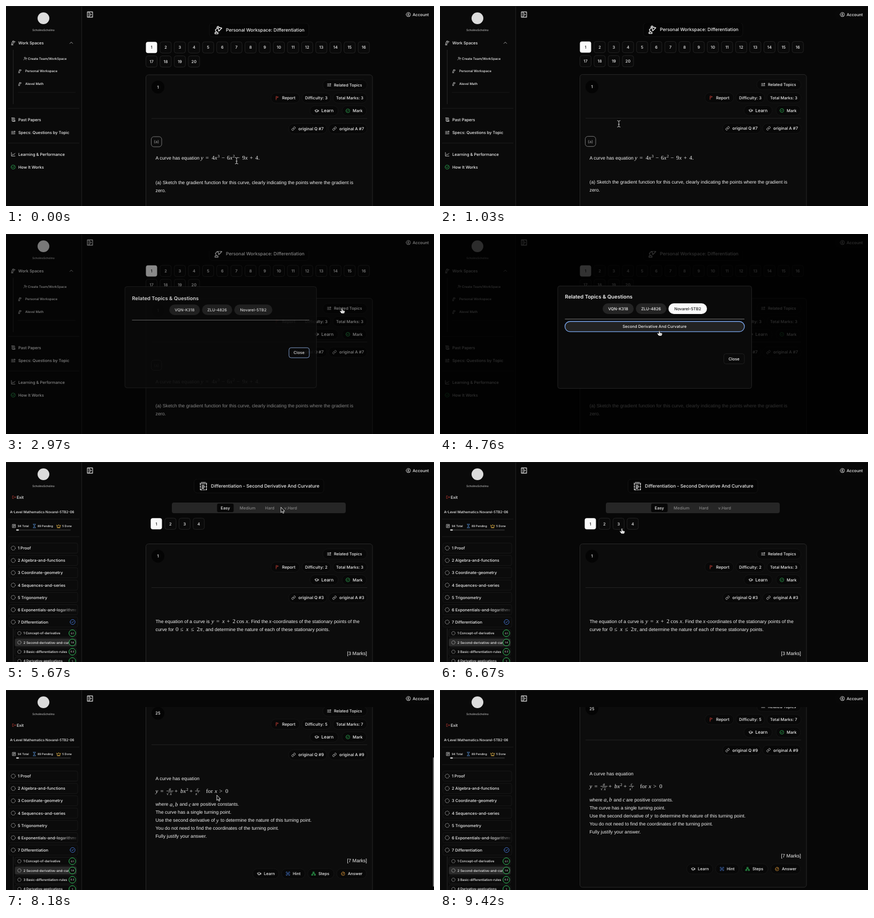
Animation, 800 px wide and 375 px high, one loop 9640 ms. Source, as an HTML page:

```html
<!DOCTYPE html>
<html lang="en">
<head>
<meta charset="utf-8">
<title>Practice workspace</title>
<style>
html, body { margin: 0; width: 100%; height: 100%; overflow: hidden; background: #070707; }
svg { display: block; width: 800px; height: 375px; }
text { font-family: Inter, sans-serif; font-weight: 500; white-space: pre; text-rendering: geometricPrecision; }
.body { font-family: "Liberation Sans", Arial, sans-serif; font-weight: 400; }
.math { font-family: "Liberation Serif", serif; font-weight: 400; }
.icon { fill: none; stroke-width: 2; stroke-linecap: round; stroke-linejoin: round; }
</style>
</head>
<body>
<svg id="stage" viewBox="0 0 800 375"></svg>
<script>
const LOOP = 9640;
const WHITE = '#f2f2f2', GREY = '#8b8b8b', GREEN = '#35c760', EDGE = '#242424';

const ICONS = {
  panel: 'M3 3h18v18H3zM9 3v18M13 9l3 3-3 3',
  user: 'M2 12a10 10 0 1 0 20 0 10 10 0 1 0-20 0M9 10a3 3 0 1 0 6 0 3 3 0 1 0-6 0M6 19c1-4 11-4 12 0',
  lamp: 'M14 5l-3 3 2 7 8-8zM14 5l-3 3-3-3 3-3zM9.5 6.5L4 12l3 6M3 22v-2q0-2 2-2h4q2 0 2 2v2z',
  list: 'M3 6h11M3 12h11M3 18h18M19 14V4l-3 3M19 4l3 3',
  flag: 'M6 22V3l12 4-12 6',
  cap: 'M22 10L12 5 2 10l10 5zM6 12v5c3 3 9 3 12 0v-5M22 10v6',
  check: 'M2 12a10 10 0 1 0 20 0 10 10 0 1 0-20 0M8 12l3 3 5-6',
  link: 'M10 13a5 5 0 0 0 7.5.5l3-3a5 5 0 0 0-7-7L12 5M14 11a5 5 0 0 0-7.5-.5l-3 3a5 5 0 0 0 7 7L12 19',
  hint: 'M3 8V3h5M16 3h5v5M21 16v5h-5M8 21H3v-5M7 12a5 5 0 1 0 10 0 5 5 0 1 0-10 0M12 11v2',
  steps: 'M9 3h6v5H9zM2 16h6v5H2zM16 16h6v5h-6zM12 8v4M5 16v-4h14v4',
  answer: 'M3 13a9 9 0 1 0 18 0 9 9 0 1 0-18 0M8 13l3 3 8-11M12 4V2',
  notes: 'M8 2v4M12 2v4M16 2v4M4 4v5M4 12v4M4 19v3h5M12 22h3M18 22h2v-3M20 16v-4M20 9V4M8 10h6M8 14h8M8 18h5',
  addUser: 'M6 7a4 4 0 1 0 8 0 4 4 0 1 0-8 0M2 21c0-9 16-9 16 0M19 8v6M16 11h6',
  scroll: 'M19 17V5q0-2-2-2H4q2 0 2 3v12q0 3 3 3h11q2 0 2-3H10v1M10 8h5M10 12h5',
  chart: 'M3 3v18h18M7 16l4-5 4 3 6-7',
  exit: 'M10 12h12M18 8l4 4-4 4M9 4H3v16h6',
  book: 'M4 3h16v18H4zM8 8h8M8 12h8M8 16h4',
  glass: 'M5 2h14M5 22h14M7 2c0 8 10 12 10 20M17 2c0 8-10 12-10 20',
  crown: 'M2 7l5 6 5-9 5 9 5-6-3 12H5zM5 22h14',
  up: 'M4 16l8-8 8 8'
};

const text = (x, y, s, size = 7.5, o = {}) =>
  `<text x="${x}" y="${y + size * .36}" font-size="${size}" fill="${o.fill || WHITE}"` +
  ` text-anchor="${o.anchor || 'start'}" class="${o.cls || ''}" style="${o.weight ? `font-weight:${o.weight}` : ''}"` +
  `${o.clip ? ` clip-path="url(#${o.clip})"` : ''}>${s}</text>`;
const mid = (x, y, s, size, fill, weight) => text(x, y, s, size, { anchor: 'middle', fill, weight });
const body = (x, y, s, size = 8.8) => text(x, y, s, size, { cls: 'body' });
const icon = (name, x, y, size = 9, color = WHITE) =>
  `<path class="icon" d="${ICONS[name]}" stroke="${color}" transform="translate(${x - size / 2} ${y - size / 2}) scale(${size / 24})"/>`;
const box = (x1, y1, x2, y2, r, fill, stroke = 'none', w = 1) =>
  `<rect x="${x1}" y="${y1}" width="${x2 - x1}" height="${y2 - y1}" rx="${r}" fill="${fill}" stroke="${stroke}" stroke-width="${w}"/>`;
const rule = (x1, y1, x2, y2, color = EDGE, w = 1) =>
  `<path d="M${x1} ${y1}L${x2} ${y2}" stroke="${color}" stroke-width="${w}"/>`;
const ring = (x, y, r, color, dash = '', fill = 'none') =>
  `<circle cx="${x}" cy="${y}" r="${r}" fill="${fill}" stroke="${color}" stroke-dasharray="${dash}"/>`;
const group = (id, content) => `<g id="${id}">${content}</g>`;

// Tokens are "x|glyphs"; ^ raises, ~ keeps letters upright, _ is small.
const math = (y, tokens) => tokens.split(' ').map(token => {
  const [x, raw] = token.split('|');
  const sup = raw[0] === '^', small = raw[0] === '_';
  const glyphs = raw.replace(/[\^~_]/, '');
  const italic = /^[a-zπ]+$/.test(glyphs) && raw[0] !== '~';
  const size = sup || small ? 7.3 : 10.7;
  return `<text class="math" x="${x}" y="${y + 3.4 - (sup ? 4 : 0)}" font-size="${size}" fill="${WHITE}"` +
    `${italic ? ' font-style="italic"' : ''}>${glyphs}</text>`;
}).join('');

const pill = (x1, x2, y, label, tx, name, color, size = 7.6) =>
  box(x1, y - 9.5, x2, y + 9.5, 9.5, '#080808', '#151515') +
  (name ? icon(name, tx - 9, y, 8.5, color) : '') + text(tx, y, label, size);

function actions(y) {
  return pill(461, 510, y, 'Learn', 482, 'cap', WHITE, 7.5) + pill(515, 559, y, 'Hint', 536, 'hint', '#4d86e8', 7.5) +
    pill(564, 613, y, 'Steps', 584, 'steps', GREEN, 7.5) + pill(618, 674, y, 'Answer', 639, 'answer', '#f0a43a', 7.5);
}

function card(top, bottom, q) {
  return box(261.5, top, 685, bottom, 5, '#0c0c0c', '#282828') +
    `<circle cx="284" cy="${top + 23}" r="12" fill="#040404"/>` + mid(284, top + 23, q.no, 7.6) +
    pill(592, 675, top + 19, 'Related Topics', 613, 'list', WHITE, 7.5) +
    pill(495, 549, top + 43.5, 'Report', 516, 'flag', '#e5483d', 7.8) +
    pill(553, 607, top + 43.5, `Difficulty: ${q.level}`, 559) +
    pill(611, 675, top + 43.5, `Total Marks: ${q.marks}`, 617, '', '', 7.5) +
    pill(568, 621, top + 67.5, 'Learn', 589.5, 'cap', WHITE, 8.3) +
    pill(628, 674, top + 67.5, 'Mark', 648, 'check', GREEN) +
    rule(272, top + 82, 675, top + 82, '#222') +
    pill(528, 600, top + 101, `original Q #${q.ref}`, 546.5, 'link', WHITE, 7.8) +
    pill(603, 675, top + 101, `original A #${q.ref}`, 623, 'link', WHITE, 7.7);
}

const pageButton = (x, y, n, on, focus) =>
  box(x - 10.5, y - 10.5, x + 10.5, y + 10.5, 4, on ? '#fafafa' : '#0a0a0a', focus ? '#3f7fe0' : on ? 'none' : '#232323') +
  mid(x, y, n, 7.5, on ? '#111' : WHITE);

function workspaceHead() {
  let s = box(380, 32, 566, 58, 6, '#050505', '#131313') + icon('lamp', 397, 45, 17) +
    text(411, 45, 'Personal Workspace: Differentiation', 8.55);
  for (let i = 0; i < 20; i++)
    s += pageButton(272 + 26.45 * (i % 16), i < 16 ? 77.7 : 104, i + 1, i === 0);
  return s;
}

function topicHead(active, pages) {
  const tabs = [['Easy', 410, 15.5], ['Medium', 451.5, 20], ['Hard', 493, 16], ['v.Hard', 532, 19]];
  let s = box(351.5, 32, 594, 58, 6, '#050505', '#131313') + icon('notes', 369, 45, 17) +
    text(383, 45, 'Differentiation - Second Derivative And Curvature', 8.55) + box(310, 76, 635, 96, 4, '#262626');
  tabs.forEach(([name, x, half], i) => {
    if (i === active) s += box(x - half, 78, x + half, 94, 3, '#070707');
    s += mid(x, 86, name, 7.6, i === active ? WHITE : '#858585');
  });
  for (let i = 0; i < pages; i++) s += pageButton(281 + 26.4 * i, 115.8, i + 1, i === 0, i === 0 && active === 3);
  return s;
}

const brand = '<circle cx="70" cy="23" r="11" fill="#dcdcdc"/>' + mid(70, 45, 'ScholinoScholino', 5.1, '#ddd', 400);

function workspaceSide() {
  return icon('lamp', 13.5, 69, 9) + text(23, 69, 'Work Spaces') + icon('up', 122, 69, 8) +
    rule(13.5, 82, 13.5, 184, '#262626') +
    icon('addUser', 36, 98.5, 7) + text(41, 98.5, 'Create Team/WorkSpace', 6.05) +
    icon('lamp', 26, 122, 7) + text(36, 122, 'Personal Workspace', 6.1) +
    icon('lamp', 26, 146, 7) + text(36, 146, 'Alevel Math', 6.1) +
    rule(22, 162, 130, 162, '#171717') + rule(4, 192, 137, 192, '#1c1c1c') + rule(4, 257, 137, 257, '#1c1c1c') +
    icon('scroll', 13.5, 213) + text(23, 213, 'Past Papers') +
    icon('list', 13.5, 237.5) + text(23, 237.5, 'Specs: Questions by Topic') +
    icon('chart', 13.5, 278) + text(23, 278, 'Learning &amp; Performance') +
    icon('check', 13.5, 302, 9, GREEN) + text(23, 302, 'How It Works');
}

function topicSide() {
  return icon('exit', 15, 66, 7.5, '#d9443b') + text(20, 66, 'Exit') +
    text(7.5, 94, 'A-Level Mathematics Novarel-5TB2-06', 6.4) + rule(4, 107, 137, 107, '#1a1a1a') +
    icon('book', 15, 120, 8) + text(22, 120, '94 Total', 5.3) + icon('glass', 53, 120, 8, '#5c9ce6') +
    text(59, 120, '89 Pending', 5.3) + icon('crown', 98.5, 120, 8.5, '#e8b84a') + text(105, 120, '5 Done', 5.3) +
    box(19, 126.5, 121, 128.5, 1, '#2a2a2a') + box(19, 126.5, 24, 128.5, 1, WHITE) + rule(4, 140, 137, 140, '#1a1a1a');
}

function topicList() {
  const chapters = ['Proof', 'Algebra-and-functions', 'Coordinate-geometry', 'Sequences-and-series',
    'Trigonometry', 'Exponentials-and-logarithms', 'Differentiation'];
  const parts = [['Concept-of-derivative', '0.1'], ['Second-derivative-and-curvature', '1.6'],
    ['Basic-differentiation-rules', '0.2'], ['Derivative-applications', '1']];
  return chapters.map((name, i) => {
    const y = 161.5 + 23.1 * i;
    return box(5.5, y - 9.5, 134, y + 9.5, 3, '#0b0b0b', '#181818') + ring(13.5, y, 3.8, '#ddd', '1.6 1.2') +
      text(22, y, `${i + 1} ${name}`, 7.5, { clip: 'side', fill: i === 5 ? 'url(#fade)' : WHITE });
  }).join('') + icon('check', 124.5, 300, 11, '#4779dc') + rule(13.5, 312, 13.5, 375, '#262626') +
  parts.map(([name, score], i) => {
    const y = 321 + 17.4 * i;
    return box(16.5, y - 7.5, 132, y + 7.5, 3, i === 1 ? '#2b2b2b' : '#0b0b0b', '#1b1b1b') +
      ring(25, y, 3.2, '#ccc', '1.4 1.1') + text(32.5, y, `${i + 1} ${name}`, 6.1, { clip: 'part' }) +
      ring(124, y, 6.3, GREEN, '', '#0b0b0b') + mid(124, y, score, 4.6, '#ccc');
  }).join('');
}

const sketchCard = card(129, 760, { no: 1, level: 3, marks: 3, ref: 7 }) +
  box(271.5, 245, 291, 264, 5, '#0c0c0c', '#777') + mid(281.2, 254.5, '(a)', 7.5, GREY) +
  body(279.5, 285, 'A curve has equation') +
  math(285, '364|y 373|= 384.5|4 390|x 395.5|^3 403|− 413|6 418.5|x 424|^2 431|− 441.5|9 447|x 455.5|+ 466|4 471.5|.') +
  body(279.5, 330.5, '(a) Sketch the gradient function for this curve, clearly indicating the points where the gradient is') +
  body(279.5, 345.5, 'zero.') + body(637.5, 390.5, '[2 Marks]', 9.1) + actions(415.8);

const cosineCard = card(153.5, 418, { no: 1, level: 2, marks: 3, ref: 3 }) +
  body(279.5, 298.5, 'The equation of a curve is') + math(298.5, '384|y 393|= 404|x 412.5|+ 423.5|2 431|~cos 448|x') +
  body(453, 298.5, '. Find the') + math(298.5, '491.5|x') +
  body(497, 298.5, '-coordinates of the stationary points of the') +
  body(279.5, 313.5, 'curve for') + math(313.5, '317|0 325.5|≤ 336.5|x 345.5|≤ 356.5|2 362|π') +
  body(368, 313.5, ', and determine the nature of each of these stationary points.') +
  body(637.5, 358.5, '[3 Marks]', 9.1) + actions(383.5);

const turningCard = card(153.8, 512, { no: 25, level: 5, marks: 7, ref: 9 }) +
  body(279.5, 298.8, 'A curve has equation') +
  math(322.5, '279.5|y 288.5|= 315|+ 326|b 331.5|x 337|^2 343|+ 374|~for 390|x 398.5|> 410|0') +
  math(318, '304.5|_a 356.5|_c') + math(327, '300|_√ 306.5|_x 354|_x') +
  text(358, 324.5, '3', 4.5, { cls: 'math' }) +
  rule(300, 322.5, 313, 322.5, WHITE, .6) + rule(304.3, 324.6, 311, 324.6, WHITE, .5) + rule(353.5, 322.5, 362.5, 322.5, WHITE, .6) +
  body(279.5, 347.5, 'where') + math(347.5, '306|a 311.5|, 316|b') + body(324.5, 347.5, 'and') + math(347.5, '341.5|c') +
  body(348, 347.5, 'are positive constants.') + body(279.5, 362.5, 'The curve has a single turning point.') +
  body(279.5, 377.5, 'Use the second derivative of') + math(377.5, '393|y') +
  body(401, 377.5, 'to determine the nature of this turning point.') +
  body(279.5, 392.5, 'You do not need to find the coordinates of the turning point.') +
  body(279.5, 407.5, 'Fully justify your answer.') + body(637.5, 452.5, '[7 Marks]', 9.1) + actions(477.5);

const chip = (x1, x2, label, on) => box(x1, 130, x2, 150, 10, on ? '#fafafa' : '#242424') +
  mid((x1 + x2) / 2, 140, label, 7.5, on ? '#111' : WHITE);
const closeButton = (y, edge) => box(530.5, y - 9.5, 569, y + 9.5, 4, '#0a0a0a', edge) + mid(549.5, y, 'Close', 7.6);

const modal = box(220, 97.5, 582.5, 289.5, 4, '#0a0a0a', '#222') +
  group('modalTop', text(233.5, 118, 'Related Topics &amp; Questions', 9.6, { weight: 600 }) +
    rule(233.5, 159.5, 569, 159.5, '#777') + chip(304, 362, 'VQN-K318') + chip(366, 423, 'ZLU-4826') +
    group('board', chip(427, 499, 'Novarel-5TB2')) + group('boardOn', chip(427, 499, 'Novarel-5TB2', true))) +
  group('unchosen', closeButton(223, '#8fb0e4')) +
  group('chosen', box(233.5, 164, 569, 183.5, 9.7, '#222') +
    mid(401, 173.7, 'Second Derivative And Curvature', 7.5) + closeButton(234, '#1f1f1f')) +
  group('focus', box(233.5, 164, 569, 183.2, 9.6, 'none', '#7aa7ee', 1.3));

const beam = (color, width) => '<path d="M-3-6Q0-6 0-4.5Q0-6 3-6M0-5V5M-3 6Q0 6 0 4.5Q0 6 3 6M-1.5 1H1.5"' +
  ` fill="none" stroke="${color}" stroke-width="${width}"/>`;
const pointers = {
  beam: beam('#000', 2) + beam('#eee', .9),
  hand: '<path d="M-1 1Q0-1 1 1V4L5 5Q6 6 5 8L4 10H-1L-4 6Q-4 4-2.5 5L-1 6Z" fill="#fff" stroke="#111" stroke-width=".7"/>' +
    '<path d="M1 6V8M3 6V8" stroke="#111" stroke-width=".5"/>',
  arrow: '<path d="M0 0V10L2.3 8L4 11.5L5.6 10.7L4 7.4H7Z" fill="#111" stroke="#eee" stroke-width=".9"/>'
};

const stage = document.getElementById('stage');
stage.innerHTML = `<defs>
  <clipPath id="view"><rect x="142" y="32" width="658" height="343"/></clipPath>
  <clipPath id="side"><rect x="0" y="140" width="131" height="235"/></clipPath>
  <clipPath id="part"><rect x="0" y="300" width="117" height="75"/></clipPath>
  <linearGradient id="fade" gradientUnits="userSpaceOnUse" x1="95" x2="132">
    <stop stop-color="${WHITE}"/><stop offset="1" stop-color="#444"/></linearGradient></defs>` +
  box(0, 0, 800, 375, 0, '#070707') + box(0, 0, 141, 375, 0, '#0a0a0a') +
  '<g clip-path="url(#view)">' + group('page',
    group('head0', workspaceHead()) + group('head1', topicHead(0, 4)) + group('head2', topicHead(3, 2)) +
    group('card0', sketchCard) + group('card1', cosineCard) + group('card2', turningCard)) + '</g>' +
  rule(141.5, 0, 141.5, 375, '#202020') + rule(0, .5, 800, .5, '#1d1d1d') + brand +
  group('side0', workspaceSide()) + group('side1', topicSide()) + group('topics', topicList()) +
  icon('panel', 157, 16, 13) + box(738, 6, 810, 26, 9, '#080808') + icon('user', 752, 16, 9.5) + text(760, 16, 'Account', 7.6) +
  '<rect id="thumb" x="798" width="2" rx="1" fill="#777"/>' +
  '<rect id="shade" width="800" height="375" fill="#000"/>' + group('modal', modal) +
  group('cursor', Object.entries(pointers).map(([id, shape]) => group(id, shape)).join(''));

const part = Object.fromEntries([...stage.querySelectorAll('[id]')].map(e => [e.id, e]));
const show = (id, on) => { part[id].style.display = on ? '' : 'none'; };
const clamp = v => Math.max(0, Math.min(1, v));
const smooth = v => v * v * (3 - 2 * v);

function track(keys, t, ease = smooth) {
  const i = keys.findIndex(k => k[0] > t);
  if (i < 0) return keys[keys.length - 1].slice(1);
  if (i === 0) return keys[0].slice(1);
  const a = keys[i - 1], b = keys[i], p = ease((t - a[0]) / (b[0] - a[0]));
  return a.slice(1).map((v, j) => v + (b[j + 1] - v) * p);
}

const cursorPath = [[0, 431, 290], [950, 335, 222], [1500, 322, 204], [1940, 322, 204], [2800, 628, 139], [3200, 628, 139],
  [3800, 464, 139], [4000, 464, 139], [4600, 410, 181], [5450, 410, 181], [5800, 560, 42], [6360, 122, 345], [6440, 60, 340],
  [6650, 340, 124.5], [6800, 340, 124.5], [7250, 533, 84], [7420, 533, 84], [7850, 394, 197], [8580, 394, 197], [9150, 471.5, 210]];
const scrollPath = [[0, 0], [1000, 0], [1600, 76.5], [1970, 76.5], [2750, 8.5], [4819, 8.5], [4820, 0],
  [7780, 0], [7910, 24], [8080, 115], [8230, 142]];
const within = (t, a, b) => t >= a && t < b;

function pointerAt(t) {
  if (t < 2450 || t >= 8950) return 'beam';
  if (within(t, 2700, 3300) || within(t, 3700, 5500) || within(t, 6300, 6480) || within(t, 6600, 7500)) return 'hand';
  return 'arrow';
}

function draw(t) {
  const onTopic = t >= 4820, loaded = t >= 4910, hardTab = t >= 7330, hardCard = t >= 7390;
  show('head0', !onTopic); show('card0', !onTopic); show('side0', !onTopic);
  show('side1', onTopic); show('topics', loaded);
  show('head1', onTopic && !hardTab); show('head2', hardTab);
  show('card1', loaded && !hardCard); show('card2', hardCard);

  const [scroll] = track(scrollPath, t, t > 7780 ? v => v : smooth);
  part.page.setAttribute('transform', `translate(0 ${-scroll})`);
  const total = onTopic ? 485 : 680;
  part.thumb.setAttribute('y', 32 + scroll / total * 343);
  part.thumb.setAttribute('height', 343 * 343 / total);
  show('thumb', within(t, 1050, 1640) || within(t, 2000, 2800) || within(t, 7780, 8390));

  const open = 1 - (1 - clamp((t - 2915) / 150)) ** 3;
  const visible = within(t, 2916, 4820), chosen = t >= 3930;
  show('shade', visible); show('modal', visible);
  part.shade.style.opacity = open * open * .8;
  part.modal.style.opacity = Math.sqrt(open);
  part.modal.setAttribute('transform', `translate(401 193.5) scale(${.95 + .05 * open}) translate(-401 -193.5)`);
  part.modalTop.setAttribute('transform', `translate(0 ${chosen ? 0 : 1.5})`);
  show('board', !chosen); show('boardOn', chosen);
  show('unchosen', !chosen); show('chosen', chosen); show('focus', t >= 4680);

  const [x, y] = track(cursorPath, t), kind = pointerAt(t);
  part.cursor.setAttribute('transform', `translate(${x} ${y})`);
  part.cursor.style.opacity = 1 - clamp((t - 9300) / 120);
  Object.keys(pointers).forEach(id => show(id, id === kind));
}

const start = performance.now();
function tick() {
  draw((performance.now() - start) % LOOP);
  requestAnimationFrame(tick);
}
tick();
</script>
</body>
</html>
```
